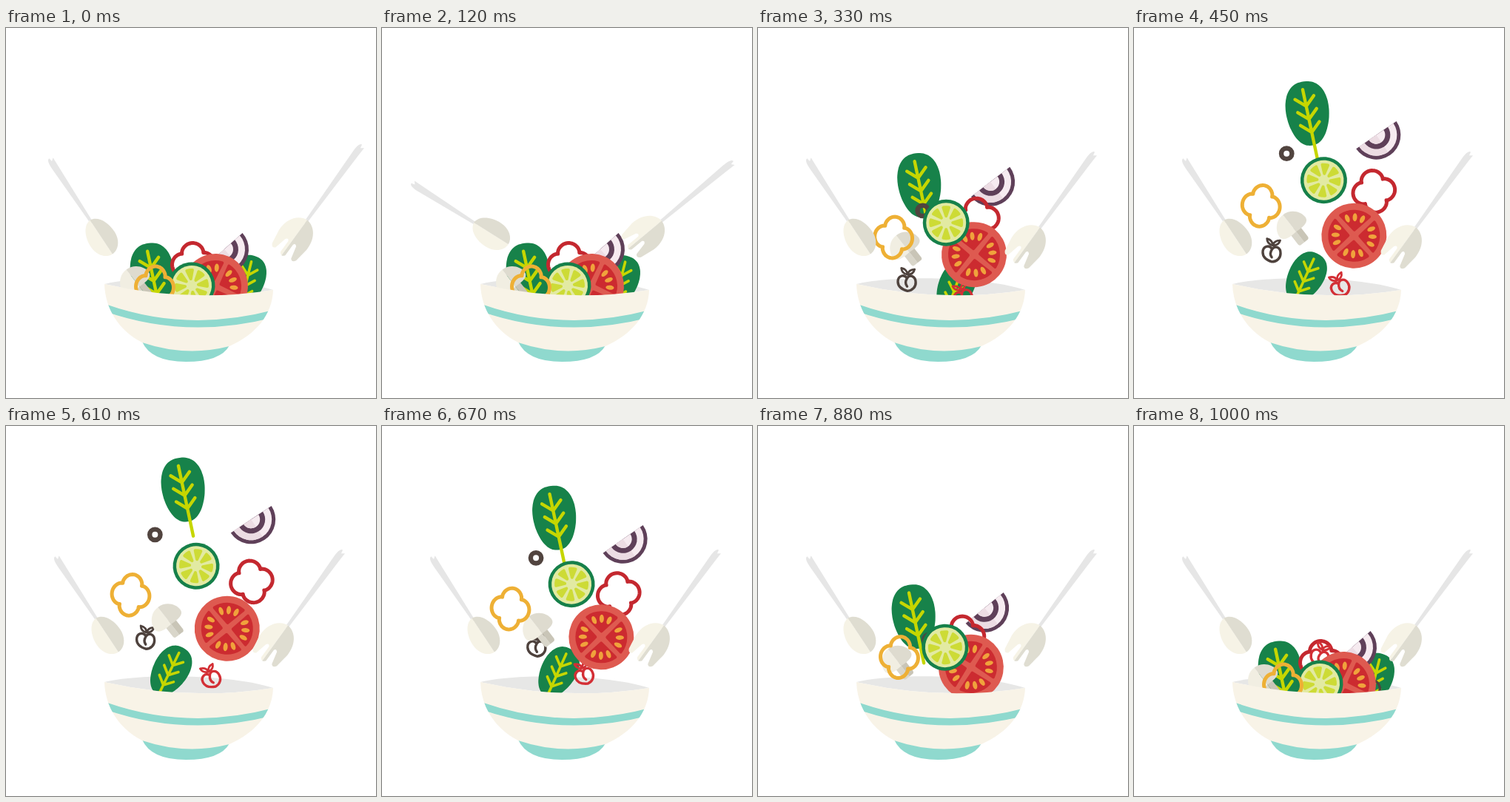
Write an HTML page that moves like this. It is 500 px wide and 500 px high and loops after 1030 ms.

```html
<!DOCTYPE html>
<html lang="en">
<head>
<meta charset="utf-8">
<title>Tossed salad</title>
<style>
html, body { margin: 0; width: 100%; height: 100%; overflow: hidden; background: #fff; }
svg { display: block; width: 100%; height: 100%; }
</style>
</head>
<body>
<svg id="stage" viewBox="0 0 500 500"></svg>
<script>
const LOOP = 1030, STEP = 30;
const REACH = 210, SETTLE = 330, PEAK = 510, FALL = 580, LAND = 1000;
const { sin, cos, abs, sign, floor, PI } = Math;

const range = n => Array.from({ length: n }, (_, i) => i);
const spin = (n, shape) => range(n).map(i => `<g transform="rotate(${i * 360 / n})">${shape}</g>`).join('');
const fill = (d, color) => `<path d="${d}" fill="${color}"/>`;
const line = (d, color, width) =>
  `<path d="${d}" fill="none" stroke="${color}" stroke-width="${width}" stroke-linecap="round" stroke-linejoin="round"/>`;
const disc = (r, color) => `<circle r="${r}" fill="${color}"/>`;

// Closed outline through the points given by a function of the angle.
const outline = point => 'M' + range(96).map(i =>
  point(i * PI / 48).map(v => v.toFixed(1)).join(' ')).join('L') + 'Z';

// Draws a right half and its mirror image in a lighter tone.
const twoTone = (d, light, dark) => `<g transform="scale(-1 1)">${fill(d, light)}</g>` + fill(d, dark);

// Round-cornered slice pointing up, one of n around a centre.
function slice(n, inner, outer, gap, color) {
  const half = PI / n - gap / outer;
  const x = outer * sin(half), y = -outer * cos(half);
  return `<path d="M0 ${-inner}L${-x} ${y}A${outer} ${outer} 0 0 1 ${x} ${y}Z" fill="${color}"
    stroke="${color}" stroke-width="4" stroke-linejoin="round"/>`;
}

function leaf(scale) {
  const blade = outline(a => [29 * sign(sin(a)) * abs(sin(a)) ** 0.85 * (1 + 0.12 * cos(a)), -43.5 * cos(a)]);
  const veins = range(3).map(i => 18 * i - 10).map(y => `M-13 ${y - 12}L0 ${y}L13 ${y - 12}`).join('');
  return `<g transform="scale(${scale})"><g transform="rotate(5)">${fill(blade, '#17824a')}</g>` +
    line('M0-33V64' + veins, '#c6d600', 4.4) + '</g>';
}

function pepper(width, height, color) {
  const radius = a => 0.72 + 0.28 * abs(cos(2 * a)) ** 0.8;
  return line(outline(a => [width * radius(a) * cos(a), height * radius(a) * sin(a)]), color, 5);
}

function tomato() {
  const seeds = [-24, 0, 24].map(a =>
    `<ellipse cy="-25" rx="3" ry="5.6" fill="#f0a23c" transform="rotate(${a})"/>`).join('');
  return disc(44, '#de5a50') + spin(4, slice(4, 8, 33, 5, '#cc2b30') + seeds);
}

const lime = () => disc(31.5, '#16804a') + disc(27, '#e2eaa2') + spin(8, slice(8, 9, 21, 4.4, '#cddb36'));

function onion() {
  const half = (r, color) => fill(`M${-r} 0A${r} ${r} 0 0 0 ${r} 0Z`, color);
  const pale = r => half(r, '#f6ebf0') + fill(`M0 0V${r}A${r} ${r} 0 0 1 ${-r} 0Z`, '#ecdce3');
  return half(33, '#5f4059') + pale(28) + half(19, '#5f4059') + pale(12);
}

const mushroom = () =>
  twoTone('M0 6H8.5V27Q8 30 6 30H0Z', '#d9d6ca', '#c9c5b7') +
  twoTone('M0-17C14-17 22-5 22 4C22 12 12 13 0 12Z', '#f1eee2', '#dedbcf');

const olive = () => `<circle r="7.2" fill="none" stroke="#51443f" stroke-width="6.4"/>`;

const berry = color =>
  line('M0-2C-5-8-13-4-12 4C-11 11-4 14 2 15C9 14 13 8 12 2C11-6 3-8 0-2C-2 2-2 6 1 9', color, 3.4) +
  line('M0-7Q-8-8-9-15Q-1-14 0-7Q1-14 9-15Q8-8 0-7', color, 2.8);

const handle = length =>
  fill(`M-2-24L-4.5 ${15 - length}Q-5 ${-length} 0 ${-length}L1 ${5 - length}L5 ${2 - length}L4.5 ${15 - length}L2-24Z`, '#e6e6e6');

const spoon = () => handle(128) + twoTone('M0-28C12-27 19-12 19 3C19 17 10 27 0 27Z', '#f6f3e6', '#dfddd1');

const fork = () => handle(155) +
  twoTone('M0-29C14-28 24-14 23 4L20 24Q17 30 13 26L9 9Q6 5 4 9V27Q2 30 0 30Z', '#f6f3e6', '#dfddd1');

const bowlBack = () => fill('M133 346C175 335 300 334 361 354Q248 372 133 346Z', '#e7e7e6');

function bowlFront() {
  const body = 'M133 346Q248 372 361 354C360 387 338 414 302 430Q243 445 184 425C153 409 134 380 133 346Z';
  return fill('M184 424Q196 451 243 451Q290 451 302 429Z', '#8fd9ce') + fill(body, '#f8f3e7') +
    `<clipPath id="body"><path d="${body}"/></clipPath>` +
    `<g clip-path="url(#body)">${line('M134 378Q245 417 362 386', '#8fd9ce', 9.6)}</g>`;
}

// Poses are [x, y, angle]. Higher throws leave the bowl a little later.
function toss(from, peak, { via, land = from } = {}) {
  const start = 105 + 0.28 * (from[1] - peak[1]);
  const track = [[start, from], [PEAK, peak], [FALL, peak], [LAND, land]];
  if (via) track.splice(1, 0, [SETTLE, via]);
  return track;
}

const swing = (from, reach, rest) => [[0, from], [REACH, reach], [SETTLE, rest]];

// Listed from back to front.
const parts = [
  [bowlBack()],
  [leaf(0.82), toss([325, 342, 14], [214, 330, 27], { via: [267, 350, 20] })],
  [leaf(1), toss([198, 334, -12], [243, 67, -12])],
  [olive(), toss([245, 352, 0], [198, 131, 0])],
  [onion(), toss([295, 299, -42], [334, 113, -33])],
  [pepper(28.5, 28.5, '#c4282f'), toss([253, 319, -3], [338, 202, -11])],
  [berry('#4e423d'), toss([225, 403, 0], [179, 281, 10], { land: [319, 352, -20] })],
  [berry('#d32f35'), toss([274, 384, -10], [278, 341, -24], { land: [252, 309, 20] })],
  [tomato(), toss([283, 349, -20], [300, 268, 7])],
  [lime(), toss([251, 348, -8], [257.5, 177, 8])],
  [mushroom(), toss([173, 340, -38], [219, 252, -38])],
  [pepper(25.5, 28, '#eeb035'), toss([201, 350, 4], [166, 219, 9])],
  [bowlFront()],
  [spoon(), swing([129, 283, -33.5], [162, 274, -76], [137, 283, -33.5])],
  [fork(), swing([390, 283, 36], [330, 276, 61], [364, 293, 36])]
];

const stage = document.getElementById('stage');
stage.innerHTML = parts.map(([shape]) => `<g>${shape}</g>`).join('');
const moving = parts.map(([, track], i) => ({ track, node: stage.children[i] })).filter(p => p.track);

function poseAt(track, t) {
  const next = track.findIndex(([time]) => time > t);
  if (next < 0) return track[track.length - 1][1];
  if (next === 0) return track[0][1];
  const [t0, a] = track[next - 1], [t1, b] = track[next];
  return a.map((v, i) => v + (b[i] - v) * (t - t0) / (t1 - t0));
}

// The motion advances in steps and pauses at the top.
function stepTime(t) {
  const fallStart = FALL + STEP;
  if (t < PEAK) return floor(t / STEP) * STEP;
  return t < fallStart ? PEAK : fallStart + floor((t - fallStart) / STEP) * STEP;
}

function draw(now) {
  const t = stepTime(now % LOOP);
  for (const { track, node } of moving) {
    const [x, y, angle] = poseAt(track, t);
    node.setAttribute('transform', `translate(${x.toFixed(2)} ${y.toFixed(2)}) rotate(${angle.toFixed(2)})`);
  }
}

const origin = performance.now();
function tick() {
  draw(performance.now() - origin);
  requestAnimationFrame(tick);
}
tick();
</script>
</body>
</html>
```
